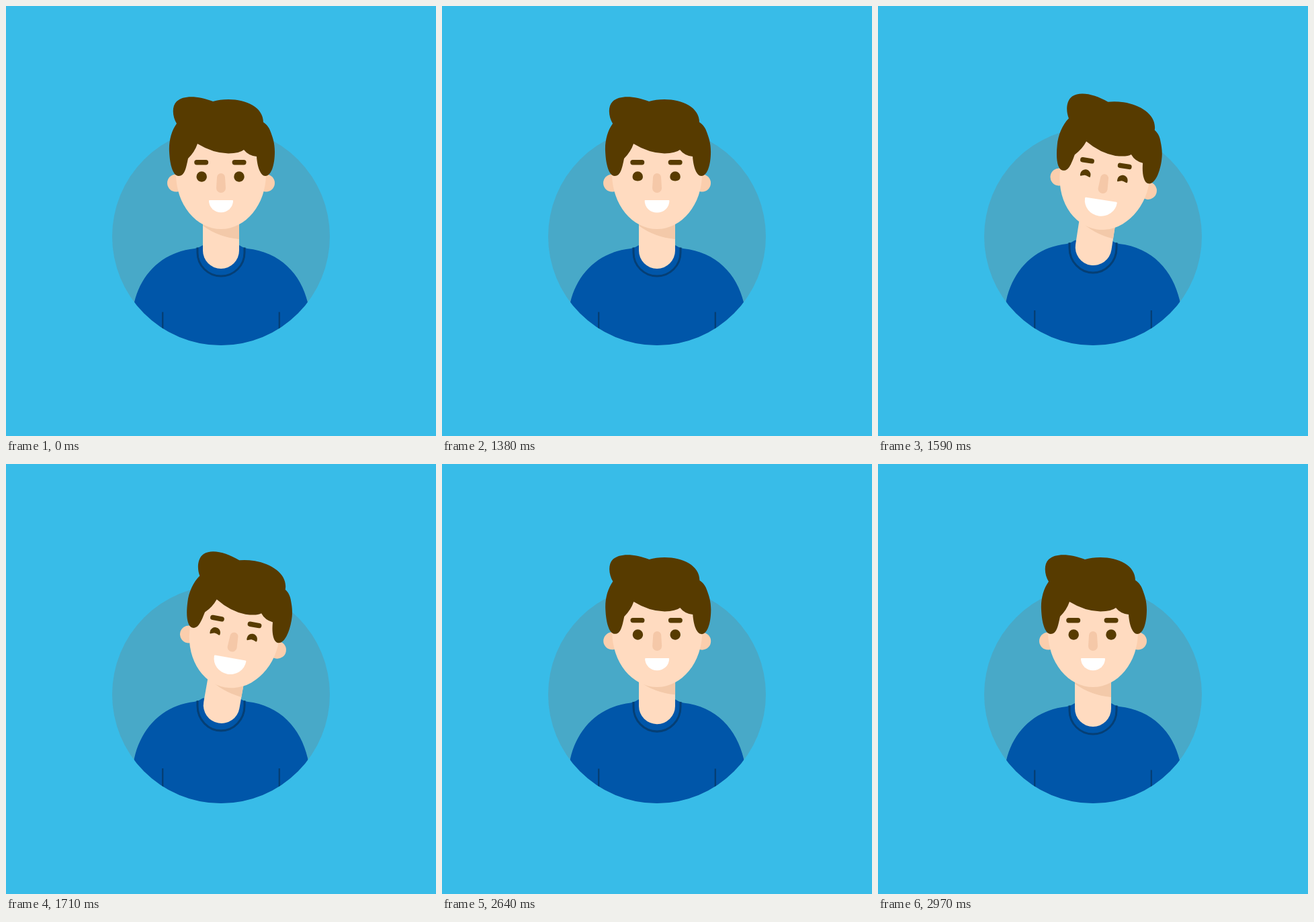
Write an HTML page that moves like this. It is 640 px wide and 640 px high and loops after 3630 ms.

```html
<!DOCTYPE html>
<html lang="en">
<head>
<meta charset="utf-8">
<title>Nodding avatar</title>
<style>
  html, body { margin: 0; width: 100%; height: 100%; overflow: hidden; background: #38bce8; }
  svg { display: block; width: 100%; height: 100%; }
</style>
</head>
<body>
<svg viewBox="0 0 640 640">
  <defs>
    <clipPath id="disc"><circle cx="320" cy="343" r="162"/></clipPath>
  </defs>
  <circle cx="320" cy="343" r="162" fill="#48a9c8"/>

  <g clip-path="url(#disc)">
    <g id="body">
      <path fill="#0056a9" d="M293 356 Q288 359.5 281 361 C232 366 201 399 191 441 Q186 465 186 520 H454 Q454 465 449 441 C439 399 408 366 359 361 Q352 359.5 347 356 Z"/>
      <g fill="none" stroke="#053f75">
        <path stroke-width="3" d="M285 359.5 V367 A35 35 0 0 0 355 367 V359.5"/>
        <path stroke-width="2.4" d="M233.2 455.5 V510 M406.8 455.5 V510"/>
      </g>
    </g>
  </g>

  <g id="neck">
    <path fill="#ffdbc0" d="M293 300 V364 A27 27 0 0 0 347 364 V300 Z"/>
    <path fill="#f3c9a9" d="M293 327 Q316 344 347 347 V305 H293 Z"/>
  </g>

  <g id="head">
    <g fill="#fbcead">
      <circle cx="253" cy="263.5" r="13"/>
      <circle cx="387" cy="263.5" r="13"/>
    </g>
    <ellipse cx="320" cy="250" rx="67" ry="82" fill="#ffdbc0"/>
    <path fill="#f5c8a8" d="M314 255 A6 6 0 0 1 326 255 L327 271 A7 7 0 0 1 313 271 Z"/>
    <path id="mouth" fill="#fff" d="M303 289 H337 Q338 289 338 290 A18 17.3 0 0 1 302 290 Q302 289 303 289 Z"/>
    <g fill="#573b00">
      <path d="M308 142 C287 134 265 132 254 142 C246 150 248 165 254 175 C246 186 242 202 243 217 C244 238 249 253 257 253 C266 253 268 241 271 227 Q281 217 285 205 Q308 219 331 219.5 Q348 219 354 214 Q361 223 373 224 C374 240 379 253 386 253 C395 253 400 236 400 217 C400 204 397 196 394.5 189 C392 181 388 176 383 173 C383 151 358 139 331 139 Q318 139 308 142 Z"/>
      <rect x="280.2" y="229" width="21" height="7.4" rx="3.7"/>
      <rect x="336.6" y="229" width="21" height="7.4" rx="3.7"/>
      <path class="eye" data-x="291.2"/>
      <path class="eye" data-x="347"/>
    </g>
  </g>
</svg>
<script>
const LOOP = 3630;
const byId = id => document.getElementById(id);
const body = byId('body'), neck = byId('neck'), head = byId('head'), mouth = byId('mouth');
const eyes = [...document.querySelectorAll('.eye')];

const mix = (a, b, p) => a + (b - a) * p;
const span = (t, from, to) => Math.min(1, Math.max(0, (t - from) / (to - from)));
const sine = p => (1 - Math.cos(Math.PI * p)) / 2;
const cubic = p => p < 0.5 ? 4 * p ** 3 : 1 - 4 * (1 - p) ** 3;

// Round eye at p = 0, cheerful arch at p = 1.
function eyePath(p) {
  const r = 7.7;
  const x1 = mix(r, 8, p), y1 = mix(4.25, 6, p);
  const x2 = mix(4.25, 5, p), y2 = mix(r, 1, p);
  return `M${-r} 0 A${r} ${r} 0 0 1 ${r} 0 C${x1} ${y1} ${x2} ${y2} 0 ${y2} ` +
    `C${-x2} ${y2} ${-x1} ${y1} ${-r} 0 Z`;
}

function draw(t) {
  const blink = sine(span(t, 360, 450)) - sine(span(t, 480, 570));
  const squint = span(t, 1350, 1530) - span(t, 2430, 2610);
  const smile = sine(span(t, 1350, 1540)) - sine(span(t, 2430, 2620));
  const rise = cubic(span(t, 1350, 1640)) - cubic(span(t, 2430, 2970));
  const angle = 10 * cubic(span(t, 1350, 1702))
    - 13.1 * sine(span(t, 2430, 2745))
    + 3.1 * sine(span(t, 2745, 2970));

  body.setAttribute('transform', `translate(0 505) scale(1 ${1 + 0.05 * rise}) translate(0 -505)`);
  neck.setAttribute('transform', `translate(${0.08 * angle} ${-5 * rise}) rotate(${angle} 320 364)`);
  head.setAttribute('transform', `rotate(${angle} 320 367)`);
  mouth.setAttribute('transform', `translate(320 294) scale(${1 + 0.34 * smile}) translate(-320 -294)`);
  const shape = eyePath(squint);
  for (const eye of eyes) {
    eye.setAttribute('d', shape);
    eye.setAttribute('transform', `translate(${eye.dataset.x} 254) scale(1 ${1 - 0.9 * blink})`);
  }
}

const start = performance.now();
function tick() {
  draw((performance.now() - start) % LOOP);
  requestAnimationFrame(tick);
}
tick();
</script>
</body>
</html>
```
